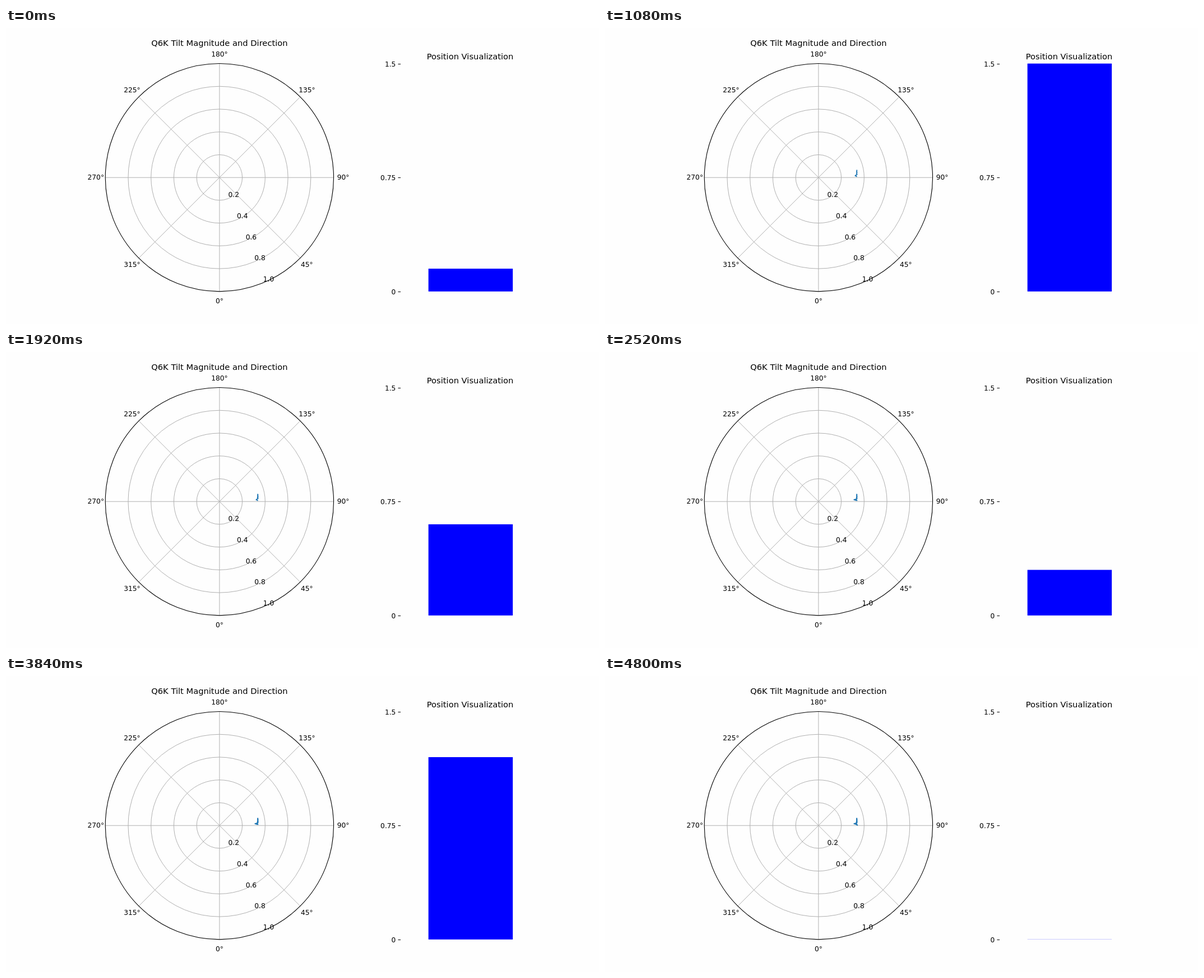
An HTML page for the animation above (4920 ms loop, 1058x529 px).

```html
<!DOCTYPE html>
<html lang="en">
<head>
<meta charset="utf-8">
<title>Tilt and position</title>
<style>
  html, body { margin: 0; width: 100%; height: 100%; overflow: hidden; background: #fefefe; }
  svg { display: block; width: 1058px; height: 529px; }
  text { font: 12.25px "DejaVu Sans", sans-serif; text-anchor: middle; }
  .title { font-size: 14.69px; }
  .start { text-anchor: start; }
  .end { text-anchor: end; }
  .grid { fill: none; stroke: #b0b0b0; stroke-width: 1; }
  .axis { fill: none; stroke: #000; stroke-width: 1.1; }
  #trace { fill: none; stroke: #1f77b4; stroke-width: 1.84; stroke-linejoin: round; stroke-linecap: square; }
  #bar { fill: #00f; }
</style>
</head>
<body>
<svg viewBox="0 0 1058 529">
  <g id="plot"></g>
  <polyline id="trace"/>
  <g id="labels"></g>
  <rect id="bar" x="753.7" width="150.5"/>
</svg>
<script>
const CX = 380.9, CY = 267.2, RADIUS = 203.65;
const BASE = CY + RADIUS, UNIT = RADIUS / 5;
const LABEL_RADIUS = 220.6;
const STEP_MS = 120, STEPS = 41;

const byId = id => document.getElementById(id);

function add(parent, tag, attrs, content = "") {
  const node = document.createElementNS("http://www.w3.org/2000/svg", tag);
  for (const [key, value] of Object.entries(attrs)) node.setAttribute(key, value);
  node.textContent = content;
  byId(parent).append(node);
}
const label = (content, x, y, kind = "") => add("labels", "text", { x, y, class: kind }, content);
const line = ([x1, y1], [x2, y2], kind) => add("plot", "line", { x1, y1, x2, y2, class: kind });

// Zero degrees points down and angles run counterclockwise
function polar(degrees, r) {
  const angle = degrees * Math.PI / 180;
  return [CX + r * Math.sin(angle), CY + r * Math.cos(angle)];
}

// Polar grid
for (let degrees = 0; degrees < 360; degrees += 45) {
  if (degrees < 180) line(polar(degrees, RADIUS), polar(degrees + 180, RADIUS), "grid");
  const [x, y] = polar(degrees, LABEL_RADIUS);
  label(`${degrees}°`, x, y + 4.1);
}
for (let ring = 1; ring <= 5; ring++) {
  const r = ring * UNIT;
  add("plot", "circle", { cx: CX, cy: CY, r, class: ring < 5 ? "grid" : "axis" });
  const [x, y] = polar(22.5, r);
  label((ring / 5).toFixed(1), x, y - 2.4, "start");
}

// Position axis
for (const value of [0, 0.75, 1.5]) {
  const y = Math.round(BASE - value / 0.15 * UNIT);
  line([699.5, y + .5], [704, y + .5], "axis");
  label(value, 695.4, y + 4.6, "end");
}

label("Q6K Tilt Magnitude and Direction", CX, 32.2, "title");
label("Position Visualization", 828.1, 56.3, "title");

// Rises 1 to 10, falls 10 to 1, twice, then ends at zero
function barUnits(step) {
  if (step === STEPS - 1) return 0;
  const phase = step % 20;
  return phase < 10 ? phase + 1 : 20 - phase;
}

// Tilt climbs with the bar, wobbles sideways and kicks left near the bottom
function tilt(step) {
  const units = barUnits(step);
  const wobble = (1.4 - units / 10) * Math.sin(2.4 * step);
  const kick = (3.3 + Math.min(step / 20, 1)) * Math.exp(-2 * (units - 2) ** 2);
  return [449.2 + wobble * .7 - kick, 266.4 - 1.2 * units];
}
const path = Array.from({ length: STEPS }, (_, step) => tilt(step));

function draw(now) {
  const step = Math.floor(now / STEP_MS) % STEPS;
  const units = barUnits(step);
  const bar = byId("bar");
  bar.setAttribute("y", units ? BASE - units * UNIT : 470);
  bar.setAttribute("height", units ? units * UNIT : 1);
  bar.setAttribute("opacity", units ? 1 : .2);
  byId("trace").setAttribute("points", step ? path.slice(0, step + 1).join(" ") : "");
}

const began = performance.now();
function tick() {
  draw(performance.now() - began);
  requestAnimationFrame(tick);
}
tick();
</script>
</body>
</html>
```
